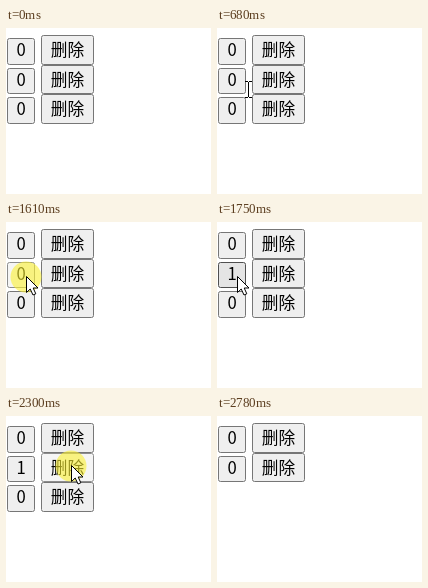
Recreate the animation shown at these times as an HTML page with a canvas. Size 205 by 166 pixels, loop 3240 ms.

```html
<!DOCTYPE html>
<html lang="zh-CN">
<head>
<meta charset="utf-8">
<style>
  html, body { margin: 0; width: 100%; height: 100%; overflow: hidden; background: #fff; }
  canvas { display: block; }
</style>
</head>
<body>
<canvas id="stage" width="205" height="166"></canvas>
<script>
const ctx = document.getElementById('stage').getContext('2d');
const LOOP = 3240, STEP = 70, ENTER = 190, REMOVED = 2360, LEAVE = 2780;
const ROW = 29.6;

const linear = k => k;
const easeOut = k => 1 - (1 - k) ** 2;
const easeInOut = k => k < .5 ? 4 * k ** 3 : 1 - 4 * (1 - k) ** 3;

const origin = { x: 168, y: 151 };
const moves = [
  { start: ENTER, end: 470, x: 71, y: 75, ease: linear },
  { start: 470, end: 680, x: 32, y: 61, ease: easeOut },
  { start: 680, end: 960, x: 20, y: 54, ease: easeOut },
  { start: 1810, end: 2090, x: 65, y: 49, ease: easeInOut },
  { start: REMOVED, end: 2710, x: 178, y: 160, ease: easeInOut }
];
const arrow = new Path2D('M.5 .5V16.5L4.2 13L7 19L9.8 17.8L7.2 12H12Z');
const between = (t, a, b) => t >= a && t < b;

function pointerAt(t) {
  if (!between(t, ENTER, LEAVE)) return null;
  let { x, y } = origin;
  for (const move of moves) {
    if (t < move.start) break;
    const elapsed = Math.floor((t - move.start) / STEP) * STEP;
    const k = move.ease(Math.min(1, elapsed / (move.end - move.start)));
    x += (move.x - x) * k;
    y += (move.y - y) * k;
  }
  return { x: Math.round(x), y: Math.round(y) };
}

function button(x, y, w, h, label, baseline, pointer, pressed) {
  const hover = pointer && between(pointer.x, x, x + w) && between(pointer.y, y, y + h);
  const [fill, line] = !hover ? ['#efefef', '#767676']
    : pressed ? ['#f5f5f5', '#8d8d8d'] : ['#e5e5e5', '#4f4f4f'];
  ctx.beginPath();
  ctx.roundRect(x + .5, y + .5, w - 1, h - 1, 2);
  ctx.fillStyle = fill;
  ctx.fill();
  ctx.strokeStyle = line;
  ctx.lineWidth = 1;
  ctx.stroke();
  ctx.fillStyle = '#000';
  ctx.fillText(label, x + w / 2, baseline);
}

function drawIBeam({ x, y }) {
  ctx.fillStyle = '#000';
  ctx.fillRect(x - 1, y - 7, 1, 15);
  for (const end of [y - 8, y + 8]) {
    ctx.fillRect(x - 4, end, 3, 1);
    ctx.fillRect(x, end, 3, 1);
  }
}

function drawArrow({ x, y }) {
  ctx.save();
  ctx.translate(x, y);
  ctx.fillStyle = '#fff';
  ctx.fill(arrow);
  ctx.strokeStyle = '#000';
  ctx.lineWidth = 1;
  ctx.stroke(arrow);
  ctx.restore();
}

function draw(t) {
  const pointer = pointerAt(t);
  const pressed = between(t, 1610, 1750) || between(t, 2160, REMOVED);
  const counts = t < REMOVED ? [0, t < 1680 ? 0 : 1, 0] : [0, 0];

  ctx.fillStyle = '#fff';
  ctx.fillRect(0, 0, 205, 166);
  ctx.font = '16.67px "Noto Sans CJK SC", "Noto Sans CJK", sans-serif';
  ctx.textAlign = 'center';
  counts.forEach((count, i) => {
    const top = Math.round(7 + ROW * i);
    const bottom = Math.round(7 + ROW * (i + 1));
    const baseline = Math.round(28 + ROW * i);
    button(1, top + 3, 28, bottom - top - 3, count, baseline, pointer, pressed);
    button(35, top, 53, bottom - top, '删除', baseline, pointer, pressed);
  });

  if (!pointer) return;
  if (pressed) {
    ctx.beginPath();
    ctx.arc(pointer.x, pointer.y + 1, 15.5, 0, 2 * Math.PI);
    ctx.fillStyle = 'rgba(250, 240, 50, .6)';
    ctx.fill();
  }
  if (between(t, 680, 750)) drawIBeam(pointer);
  else drawArrow(pointer);
}

function tick() {
  draw(performance.now() % LOOP);
  requestAnimationFrame(tick);
}
tick();
</script>
</body>
</html>
```
